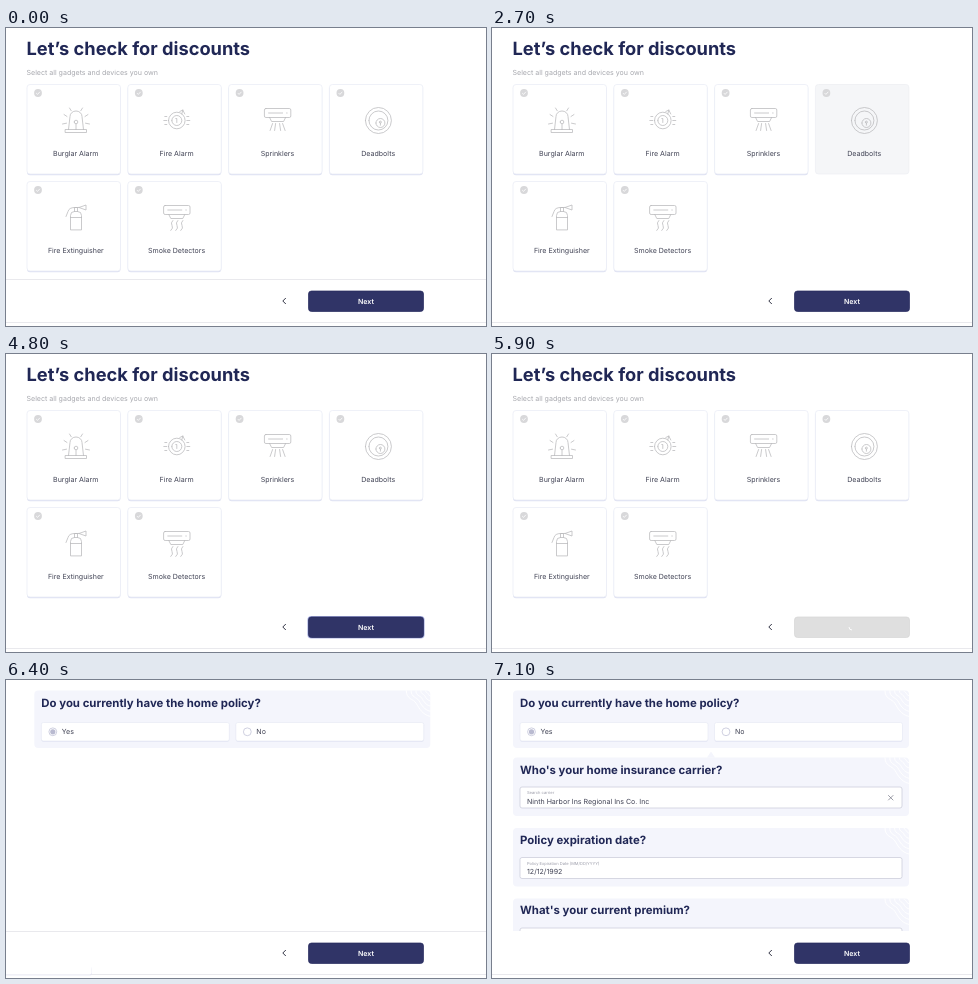
An HTML page for the animation above (7.2 s loop, 480 by 298 pixels).

```html
<!DOCTYPE html>
<html lang="en">
<head>
<meta charset="utf-8">
<style>
  html, body { margin: 0; width: 100%; height: 100%; overflow: hidden; background: #fff; }
  svg { display: block; width: 480px; height: 298px; font: 7.05px Inter, sans-serif; fill: #3f4153; text-rendering: geometricPrecision; }
  .title { font-weight: 700; font-size: 18.25px; fill: #202755; }
  .question { font-weight: 700; font-size: 11.4px; fill: #202755; }
  .sub { fill: #a6a7ad; }
  .mid { text-anchor: middle; }
  .tiny { font-size: 4.05px; fill: #9a9ba8; }
  .icon { fill: none; stroke: #b8b8bb; stroke-width: .75; stroke-linecap: round; stroke-linejoin: round; }
  .shade { fill: #dfe2f2; }
  .face { fill: #fff; stroke: #e9ebf5; stroke-width: .7; }
  .hover .face { fill: #f5f6f8; stroke: #eceef3; }
  .hover .shade { display: none; }
  .panel { fill: #f4f5fc; }
  .swirl { fill: none; stroke: #fff; stroke-width: .9; }
  .field { fill: #fff; stroke: #cdcfdc; stroke-width: .8; }
  .rule { stroke: #e9e9ed; }
</style>
</head>
<body>
<svg viewBox="0 0 480 298">
  <defs><clipPath id="view"><rect width="480" height="251"/></clipPath></defs>
  <g id="gadgets">
    <text class="title" x="20.5" y="27">Let’s check for discounts</text>
    <text class="sub" x="20.5" y="46.5">Select all gadgets and devices you own</text>
    <g id="cards"></g>
  </g>
  <g id="form" clip-path="url(#view)"></g>
  <path id="line" class="rule" d="M0 251.5H480"/>
  <path class="rule" d="M0 294.5H480"/>
  <g id="status">
    <rect class="shade" x="-4" y="287" width="90" height="8.5" rx="2" opacity=".6"/>
    <rect x="-4" y="286" width="89.5" height="8.5" rx="2" fill="#fff"/>
  </g>
  <circle id="halo" cx="278" cy="273" r="11" fill="#f1f1f4"/>
  <path d="M279.8 270l-3 3 3 3" fill="none" stroke="#333546"/>
  <rect id="glow" x="301.4" y="261.9" width="117.2" height="22.7" rx="4" fill="#a9b0e0"/>
  <rect id="next" x="302.5" y="263" width="115" height="20.5" rx="3"/>
  <text id="nextText" class="mid" x="360" y="275.8" fill="#fff" font-weight="600">Next</text>
  <path id="spin" d="M360 276a3 3 0 0 1 -3 -3" fill="none" stroke="#fff" stroke-width=".9"/>
</svg>
<script>
const $ = id => document.getElementById(id);
const LOOP = 7200, STEP = 100;
const clamp = v => Math.max(0, Math.min(1, v));
const circle = (x, y, r) => `M${x - r} ${y}a${r} ${r} 0 1 0 ${2 * r} 0a${r} ${r} 0 1 0 ${-2 * r} 0`;

// Icon paths are drawn around the centre of each card's icon area.
const detector = 'M-11.7 -12h23.4q1.5 0 1.5 1.5v6q0 1.5 -1.5 1.5h-23.4q-1.5 0 -1.5 -1.5v-6q0 -1.5 1.5 -1.5zM-9 -7.5H5M9 -7.5h.5M-8 -3l2 4H6L8 -3';
const wave = x => `M${x} 3q-2.5 2.5 -.8 5t-1.2 5`;
const gadgets = [
  ['Burglar Alarm', 'M-7.5 9L-6 -4a6 5.5 0 0 1 12 0L7.5 9M-10.5 9h21v3h-21zM0 3.5V9' + circle(0, 1.5, 1.8) +
    'M-13.5 3.5l4 -.8M-12 -6l3 2M-6.5 -12.5l1.7 2.7M13.5 3.5l-4 -.8M12 -6l-3 2M6.5 -12.5l-1.7 2.7'],
  ['Fire Alarm', circle(0, 0, 8.3) + circle(0, 0, 5) + 'M-1 -2h1v4M-12 -4h2M-13 0h3M-12 4h2M12 -4h-2M13 0h-3M12 4h-2M3 -9l3 -1.5 2 4M6 -10.5l-1 4'],
  ['Sprinklers', detector + 'M-5 3l-2.5 7M-2 3l-1 7M2 3l1 7M5 3l2.5 7'],
  ['Deadbolts', circle(0, 0, 13) + circle(0, 0, 9.5) + circle(2, 2.5, 4.5) + circle(2, 1.6, 1) + 'M2 2.7v2'],
  ['Fire Extinguisher', 'M-5.5 12V-2q0 -4 4 -4h3q4 0 4 4v14zM-5.5 0h11M-1.5 -6v-4h3v4M-1 -10h4l7 -2.5v5l-7 -2.5M-1.5 -10q-5.5 0 -6.5 4l-2 5'],
  ['Smoke Detectors', detector + wave(-4) + wave(1) + wave(6)]
];

$('cards').innerHTML = gadgets.map(([name, icon], i) => {
  const x = 21 + i % 4 * 100.8, y = i < 4 ? 56.5 : 153.5;
  return `<g transform="translate(${x} ${y})">
    <rect class="shade" y="1" width="93.5" height="89.8" rx="3"/>
    <rect class="face" width="93.5" height="89.5" rx="3"/>
    <circle cx="11" cy="8.5" r="3.9" fill="#d8d8da"/>
    <path d="M9.2 8.6l1.3 1.3 2.4 -2.6" fill="none" stroke="#fff" stroke-width=".8"/>
    <path class="icon" transform="translate(49 36)" d="${icon}"/>
    <text class="mid" x="48.8" y="71">${name}</text></g>`;
}).join('');

const radio = (x, label, on) => `
  <rect class="shade" x="${x}" y="43.3" width="188" height="18.5" rx="2"/>
  <rect class="face" x="${x}" y="42.5" width="188" height="18.5" rx="2"/>
  <circle cx="${x + 11.5}" cy="51.8" r="3.9" fill="#fff" stroke="#c3c4d8" stroke-width=".8"/>
  ${on ? `<circle cx="${x + 11.5}" cy="51.8" r="2.6" fill="#b9bad0"/>` : ''}
  <text x="${x + 20.5}" y="54.4">${label}</text>`;
const field = (y, label, value) => `
  <rect class="field" x="28" y="${y}" width="382" height="21" rx="2"/>
  <text class="tiny" x="35" y="${y + 7.3}">${label}</text>
  <text x="35" y="${y + 16.6}">${value}</text>`;
// Nested contour lines shrinking into the panel's top right corner.
const swirl = y => [1, .8, .6, .4, .2].map(s =>
  `<path class="swirl" stroke-width="${.9 / s}" vector-effect="non-scaling-stroke" transform="translate(417 ${y}) scale(${s})"
    d="M-24 0c0 9 7 8 10 13s6 11 14 13"/>`).join('');

const sections = [
  [10.5, 57.5, 27, 'Do you currently have the home policy?', radio(28, 'Yes', true) + radio(222.5, 'No')],
  [77.5, 58.5, 93.7, "Who's your home insurance carrier?",
    '<path class="panel" d="M215 77.5l4 -6 4 6z"/>' + field(107, 'Search carrier', 'Ninth Harbor Ins Regional Ins Co. Inc') +
    '<path class="icon" style="stroke:#777987" d="M396.5 115.5l4.5 4.5m0 -4.5l-4.5 4.5"/>'],
  [148, 58.5, 164, 'Policy expiration date?', field(177.5, 'Policy Expiration Date (MM/DD/YYYY)', '12/12/1992')],
  [218.5, 58.5, 234.3, "What's your current premium?", field(248, '', '')]
];
$('form').innerHTML = sections.map(([y, h, base, title, body]) => `<g>
  <rect class="panel" x="21" y="${y}" width="396" height="${h}" rx="4"/>
  ${swirl(y)}
  <text class="question" x="28" y="${base}">${title}</text>${body}</g>`).join('');

const show = (id, opacity) => $(id).setAttribute('opacity', opacity);
const hoverTimes = [1100, 1500, 2200, 2700, 3000, 3400, 3700];
const formStart = 6200;

function draw(now) {
  const t = Math.floor(now % LOOP / STEP) * STEP;
  const onForm = t >= formStart, loading = t >= 5500 && !onForm;

  show('gadgets', onForm ? 0 : 1);
  show('form', onForm ? 1 : 0);
  show('line', t < 600 || onForm && t < 6700 ? 1 : 0);
  show('status', onForm ? clamp((6600 - t) / 200) : 0);
  [...$('cards').children].forEach((card, i) =>
    card.classList.toggle('hover', t >= hoverTimes[i] && t < hoverTimes[i + 1]));

  // Each section eases in from the right after the one before it.
  [...$('form').children].forEach((section, i) => {
    const start = i ? 6300 + i * 100 : 6150;
    const p = clamp((t - start) / 437);
    section.setAttribute('transform', `translate(${40 * (1 - p) ** 2} 0)`);
    section.setAttribute('opacity', clamp((t - start + 50) / 200) * (t > start));
  });

  show('halo', t < 4600 ? clamp((t - 3600) / 200) : clamp((4800 - t) / 300));
  show('glow', loading || onForm ? 0 : clamp((t - 4500) / 300));
  $('next').setAttribute('fill', loading ? '#dfdfdf' : '#303467');
  $('next').setAttribute('stroke', loading ? '#d6d6d6' : '#262a5e');
  $('next').setAttribute('stroke-width', .7);
  show('nextText', loading ? 0 : 1);
  show('spin', loading ? 1 : 0);
  $('spin').setAttribute('transform', `rotate(${(t - 5900) * .36} 360 273)`);
}

function tick() {
  draw(performance.now());
  requestAnimationFrame(tick);
}
tick();
</script>
</body>
</html>
```
